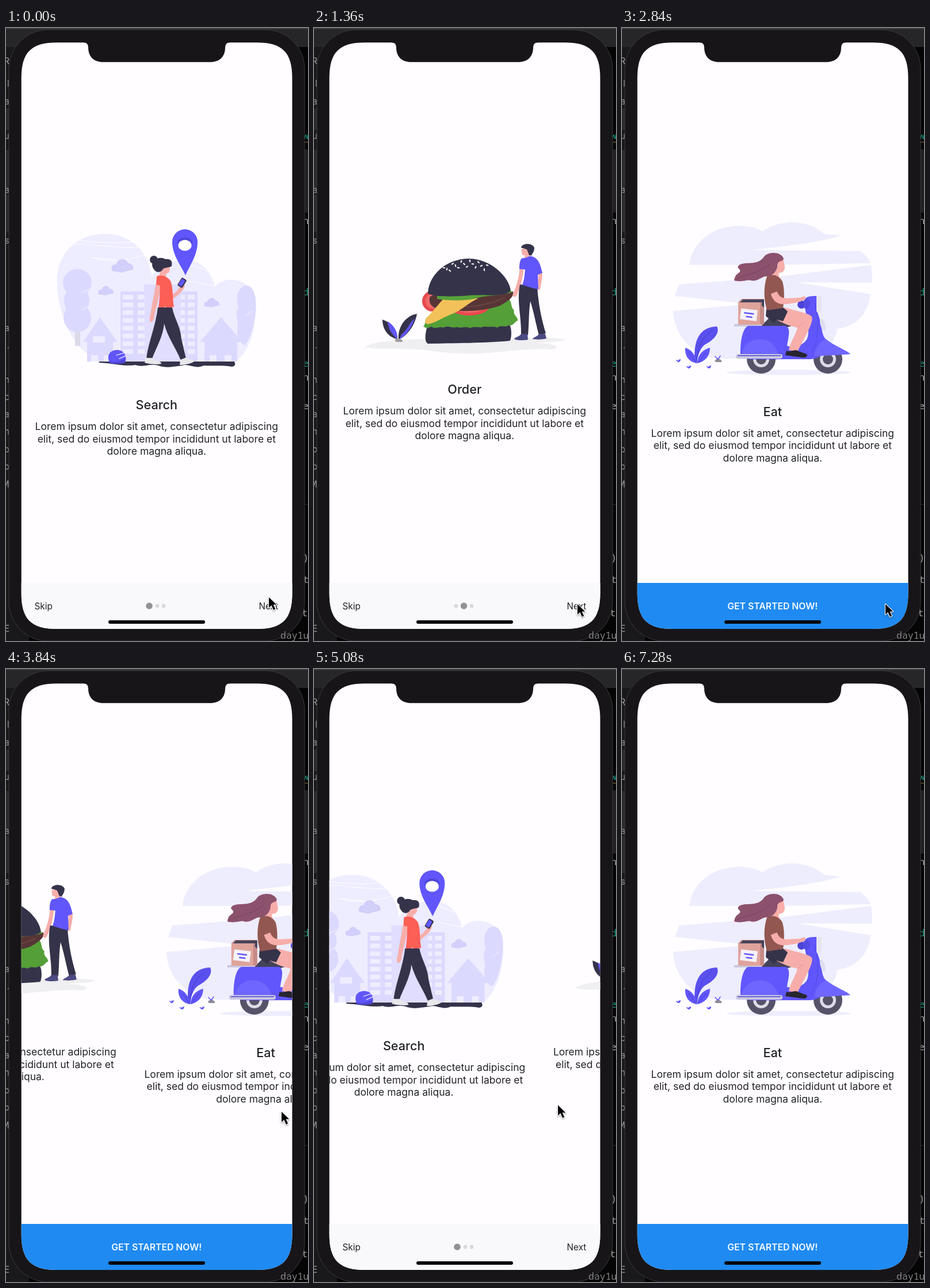
Recreate the animation shown at these times as an HTML page with a canvas. Size 525x1066 px, loop 7.32 s.

```html
<!DOCTYPE html>
<html lang="en">
<head>
<meta charset="utf-8">
<title>Onboarding</title>
<style>
html, body { margin: 0; width: 100%; height: 100%; overflow: hidden; background: #111; }
canvas { display: block; width: 525px; height: 1066px; }
</style>
</head>
<body>
<canvas id="stage" width="525" height="1066"></canvas>
<script>
const c = document.getElementById('stage').getContext('2d');
const LOOP = 7320, PAGE = 471, MID = 261.8;
const NAVY = '#35334a', BLUE = '#6156fb', SKIN = '#f7aeaa', HAZE = '#eeecff', LILAC = '#dcd9ff';
const SANS = 'Inter, sans-serif', MONO = '"Noto Sans Mono", monospace';

// Drawing helpers
const cache = new Map();
function path(d) {
  if (!cache.has(d)) cache.set(d, new Path2D(d));
  return cache.get(d);
}
function fill(color, d) { c.fillStyle = color; c.fill(path(d)); }
function line(color, width, d) {
  c.strokeStyle = color; c.lineWidth = width;
  c.lineCap = c.lineJoin = 'round';
  c.stroke(path(d));
}
function rect(color, x, y, w, h, r = 0) {
  c.fillStyle = color; c.beginPath(); c.roundRect(x, y, w, h, r); c.fill();
}
function oval(color, x, y, rx, ry = rx, turn = 0) {
  c.fillStyle = color; c.beginPath(); c.ellipse(x, y, rx, ry, turn, 0, 7); c.fill();
}
function text(str, x, y, font, color = '#222124', align = 'center') {
  c.font = font; c.fillStyle = color; c.textAlign = align;
  c.fillText(str, x, y);
}
function placed(x, y, angle, draw) {
  c.save(); c.translate(x, y); c.rotate(angle); draw(); c.restore();
}

// Motion
function easeIn(x) {
  if (x <= 0) return 0;
  if (x >= 1) return 1;
  let lo = 0, hi = 1;
  for (let i = 0; i < 22; i++) {
    const s = (lo + hi) / 2;
    if (1.26 * s * (1 - s) ** 2 + 3 * s * s - 2 * s ** 3 < x) lo = s; else hi = s;
  }
  return 3 * lo * lo - 2 * lo ** 3;
}
const smooth = u => u * u * (3 - 2 * u);
const pull = u => u ** 1.5;

// Drag by 188 px, then an overdamped spring to the previous page
function swipe(t, start) {
  const s = (t - start) / 1000;
  if (s <= 0) return 0;
  if (s < 0.2) return 188 / PAGE * pull(s / 0.2);
  const r = s - 0.2;
  return 1 - 0.79 * Math.exp(-9.07 * r) + 0.19 * Math.exp(-22 * r);
}
function pageAt(t) {
  if (t < 1500) return easeIn((t - 730) / 270);
  if (t < 3500) return 1 + easeIn((t - 2019.5) / 350);
  if (t < 4700) return 2 - swipe(t, 3640);
  if (t < 6100) return 1 - swipe(t, 4747);
  return 2 * easeIn((t - 6190) / 350);
}

const moves = [
  [0, 457, 989], [250, 457, 989], [600, 458, 1001], [3090, 458, 1001],
  [3600, 291, 772], [3640, 291, 772], [3840, 479, 769, pull], [3900, 482, 768],
  [4500, 238, 746], [4747, 238, 746], [4947, 426, 752, pull], [5040, 430, 754],
  [5580, 70, 971], [5660, 70, 971], [5900, 62, 1000], [6600, 62, 1000], [7200, 560, 930], [LOOP, 560, 930]
];
function cursorAt(t) {
  const i = moves.findIndex(m => m[0] > t);
  const [t0, x0, y0] = moves[i - 1], [t1, x1, y1, ease = smooth] = moves[i];
  const u = ease((t - t0) / (t1 - t0));
  return [x0 + (x1 - x0) * u, y0 + (y1 - y0) * u];
}

// Illustrations
function cloud(x, y, k) {
  c.save(); c.translate(x, y); c.scale(k, k);
  fill('#d1cefa', 'M-18 9C-22 2 -17 -4 -11 -3C-10 -13 5 -16 9 -5C15 -5 20 0 18 6C12 7 9 9 4 9C-2 14 -9 9 -18 9Z');
  line('#dcd9ff', 1, 'M-12 3L-3 8M-7 -2L7 6M-3 -7L13 3');
  c.restore();
}

function search() {
  fill(HAZE, 'M89 440C88 388 128 358 172 358C213 358 240 384 249 412L254 432C268 409 293 402 318 404C342 407 358 426 363 450C373 439 385 437 395 438C421 440 435 462 435 483C434 524 424 562 399 580L163 580C118 562 89 500 89 440Z');
  line('#fff', 1, 'M108 377C150 371 200 388 246 380M120 368C165 376 195 373 225 372M190 403L148 399C185 410 218 402 243 394M318 410L350 423M320 440L363 449');
  rect('#dcdae9', 120, 522, 9, 31);
  oval(LILAC, 124, 443, 25, 24); oval(LILAC, 123, 474, 22, 24); oval(LILAC, 124, 504, 24, 25);
  fill(LILAC, 'M434 470C431 450 420 444 411 450C399 459 401 474 404 486C397 498 403 506 403 517C399 533 405 548 416 552C428 535 436 500 434 470Z');
  line(HAZE, 1.5, 'M133 459L149 453M132 490L147 482M417 500L428 492');
  rect(LILAC, 199, 458, 134, 122); rect('#e0ddff', 240, 446, 65, 134);
  for (let y = 464; y < 572; y += 13.5) {
    rect(HAZE, 203, y, 18, 8); rect(HAZE, 229, y, 12, 8);
    rect(HAZE, 304, y, 7, 8); rect(HAZE, 316, y, 12, 8);
  }
  fill(LILAC, 'M163 503L194 546H186V580H141V546H134ZM374 503L411 546H402V580H345V546H337Z');
  rect(HAZE, 151, 536, 21, 11);
  for (const x of [148, 170, 354, 380]) rect(HAZE, x, 569, 12, 11);
  cloud(203, 414, 1); cloud(174, 457, 0.7); cloud(358, 478, 0.7);
  fill(NAVY, 'M162 580H397Q401 588 393 589C375 586 360 588 344 587C329 594 318 583 306 587C288 589 278 592 265 587C247 583 240 591 225 586C203 589 188 583 162 582Z');
  fill(BLUE, 'M180 582C174 569 181 560 193 560C205 560 211 570 207 582C197 585 188 584 180 582Z');
  fill('#4e46d5', 'M179 579C187 583 200 580 207 574L207 582C198 585 186 585 179 582Z');
  line('#fff', 1.3, 'M192 569L205 565M197 575L208 570');
  fill(BLUE, 'M312 430C304 412 289 395 289 372A22 22 0 0 1 333 372C333 395 320 412 312 430Z');
  oval('#4f46db', 311, 374, 13, 10); oval('#fff', 311, 378, 11.5, 9.5);

  fill(SKIN, 'M269 415L284 412C286 420 285 425 278 428L279 437L266 435Z');
  oval(NAVY, 257, 403, 7);
  fill(NAVY, 'M254 413C253 402 268 396 277 402C286 401 290 405 288 414C284 417 277 416 273 419C269 427 258 427 254 413Z');
  fill(SKIN, 'M285 464C293 464 299 455 303 449L311 447C310 456 297 468 287 472Z');
  placed(306, 443, 0.55, () => { rect(NAVY, -5, -8, 10, 16, 2); rect(BLUE, -4, -6, 7, 12, 1); });
  fill('#fb5f55', 'M262 432C268 428 280 431 286 440C291 451 289 470 292 485L279 487L277 484L274 487H265C267 474 268 461 267 448L261 447Z');
  fill(NAVY, 'M264 486H289C293 507 303 517 305 541L313 575L304 578C294 554 281 538 275 514C273 537 260 558 254 575L244 574C248 544 260 519 264 486Z');
  fill(SKIN, 'M260 446L268 448C267 470 261 484 258 499C258 506 255 512 251 511C248 507 251 500 252 494C254 477 258 463 260 446Z');
  fill('#e8e8eb', 'M244 573C250 575 254 572 257 576C263 580 270 579 270 584C260 586 247 584 241 582ZM303 577L313 573C318 577 327 576 327 580C321 584 309 586 302 586Z');
}

function order() {
  fill('#efeef0', 'M88 555C100 545 150 541 195 541H340C380 538 425 538 437 542C430 546 400 546 385 548C425 548 427 556 415 559C380 556 330 563 290 566C250 567 205 563 195 560C150 556 110 560 88 555Z');
  fill(NAVY, 'M145 541C130 538 119 525 119 507C134 512 143 524 145 541ZM147 542C145 519 160 500 179 497C176 515 164 534 147 542Z');
  fill(BLUE, 'M145 541C133 531 129 521 128 510C140 518 146 529 145 541ZM149 541L152 533C162 526 166 512 175 505C170 520 161 534 149 541Z');
  fill('#a19fa1', 'M140 542Q146 537 154 543L153 546H143Z');

  fill(NAVY, 'M197 518C240 515 300 518 340 516C345 524 343 544 340 544C300 548 240 548 198 549C191 545 194 529 197 518Z');
  oval('#e8494e', 206, 475, 18); oval('#f06a69', 207, 475, 13);
  fill('#549f38', 'M190 519C196 514 190 507 199 501C220 494 300 490 338 470C345 477 341 485 348 491C345 499 356 503 354 509C349 510 347 519 338 517C332 522 326 515 319 521C311 518 304 521 296 519C288 523 280 517 271 522C263 518 257 523 249 520C240 523 233 516 225 521C216 518 211 525 204 519C198 523 194 522 190 519Z');
  oval('#e8494e', 270, 484, 35, 16); oval('#f06a69', 270, 482, 28, 13);
  fill('#573537', 'M201 468C215 456 250 469 283 468C310 465 331 461 346 458C349 467 338 475 323 483C288 495 246 494 211 487C202 483 200 477 201 468Z');
  line('#6b4441', 2, 'M228 482C264 488 302 483 331 469');
  fill('#f3c15a', 'M224 472L286 470C265 480 258 490 243 496C226 502 211 513 198 515C192 514 191 509 197 503Z');
  fill('#57a33a', 'M214 466C250 460 312 463 337 453L345 459C323 467 296 464 278 471C257 475 231 474 214 471Z');
  fill(NAVY, 'M198 462C199 430 229 401 270 401C309 402 340 434 342 457C330 469 300 463 270 465C237 468 207 467 198 462Z');
  for (let i = 0; i < 16; i++) {
    const x = 226 + 5 * i, y = 405 + ((x - 268) / 42) ** 2 * 12 + (i * 7 % 3) * 5;
    placed(x, y, i * 1.9, () => oval('#fff', 0, 0, 2.5, 1.1));
  }

  line(SKIN, 7, 'M361 418C360 435 356 449 349 464M393 424C395 435 391 443 390 452');
  fill(SKIN, 'M361 384L375 383L375 400L365 401L367 395Q360 398 361 384Z');
  fill(NAVY, 'M360 382C361 374 379 373 383 382C383 390 379 392 378 396L374 395L370 385Z');
  fill(NAVY, 'M358 446L388 449C390 481 396 508 403 531L391 534C385 512 382 493 376 475C373 495 374 515 372 534H360C361 502 352 476 358 446Z');
  fill(BLUE, 'M362 400C370 401 373 396 378 397C391 400 394 413 397 426L389 429L390 454C379 453 371 449 362 447C366 437 366 428 367 420L357 419C357 409 358 403 362 400Z');
  fill('#4b4a82', 'M360 532H371L372 542C363 544 352 543 348 541C350 537 357 537 360 532ZM391 532H402L404 540C396 542 386 542 380 541C382 537 388 537 391 532Z');
}

function sprout() {
  fill(BLUE, 'M0 3C-3 2 -4 0 -4 -1C-2 -1 0 1 0 3C0 0 1 -2 4 -2C4 1 2 3 0 3M-1 3L0 -3L1 3');
}

function wheel(x) {
  oval('#565369', x, 576, 25); oval('#dddce8', x, 576, 14);
  oval('#565369', x, 576, 9);
}

function eat() {
  const mist = '#eeedfd';
  fill(mist, 'M117 412C122 370 160 344 203 344C225 344 240 350 244 354C272 333 322 331 351 358L381 361C340 374 278 380 225 386L415 388C423 394 430 403 432 409L270 412Z');
  fill(mist, 'M99 446L275 432L433 412Q435 426 435 443L303 442L432 463C428 495 410 518 375 523C368 552 350 575 300 575H165C112 566 90 525 89 492L225 480L92 466Z');
  oval(mist, 290, 599, 108, 4.5);
  fill('#5a50ee', 'M127 582C123 545 134 520 165 519C172 532 154 546 145 550C136 556 132 568 130 583Z');
  fill(BLUE, 'M130 583C114 580 109 568 110 556C122 560 129 570 130 583ZM131 583C131 570 140 559 153 556C153 570 145 580 131 583Z');
  line('#403acb', 0.8, 'M130 581C130 558 139 538 157 526M130 582L116 564M132 582L146 564');
  for (const [x, y] of [[98, 578], [116, 589], [151, 589]]) placed(x, y, 0, sprout);
  fill('#8f8d96', 'M161 578L167 574L173 578V581H163Z');
  line(BLUE, 1.5, 'M167 576L162 571M167 576L171 570');

  wheel(242); wheel(358);
  fill('#cac8df', 'M195 515H245V519H195Z');
  fill('#44435a', 'M243 517L258 502L299 517L288 520H245Z');
  fill(BLUE, 'M206 570C205 535 213 519 220 518H285C295 523 288 541 287 553C301 556 314 552 321 542C329 529 319 497 316 474Q319 465 338 466L340 495C348 515 346 531 353 540C370 554 390 560 397 567L345 570C336 576 329 576 320 576H222Z');
  fill('#6e66ff', 'M207 569A33 34 0 0 1 272 569ZM354 541C371 554 389 560 397 567L334 571Q336 551 354 541Z');
  line('#5148e0', 1, 'M334 478C344 506 342 547 329 565');
  rect('#cac8df', 198, 567, 81, 8, 4); rect('#4f48d8', 201, 569, 75, 1.5);
  rect('#e6e5ee', 338, 466, 9, 29, 4); oval('#dfddf0', 349, 516, 4, 11, -0.3);
  oval('#4b43d7', 312, 481, 7); oval('#554ce4', 321, 480, 6, 9);

  rect('#dfa39b', 202, 477, 43, 39); rect('#c58b87', 240, 476, 7, 39);
  fill('#cf9690', 'M202 477L208 471H247L240 478H202Z');
  fill('#44435a', 'M205 477L210 472H247V486L243 483V477Z');
  placed(220, 498, 0.12, () => {
    rect('#f4f1f8', -14, -9, 29, 19);
    rect(BLUE, -8, -3, 17, 2.5); rect(BLUE, -4, 3, 11, 2.5);
  });

  fill(SKIN, 'M275 495L283 486C301 492 324 495 330 502C334 512 316 540 305 563L290 560C293 545 302 534 305 521C294 519 278 513 267 506Z');
  line('#e3908f', 1, 'M306 521L315 513');
  fill('#27252f', 'M286 561C293 565 300 557 307 562L321 567Q324 573 314 573L284 569Z');
  fill(NAVY, 'M251 488L279 485L288 493L280 510L269 507L264 513L250 501Z');
  fill(SKIN, 'M264 409L280 401L283 415Q283 426 272 426L274 437L260 434Z');
  fill('#925750', 'M252 432C262 426 274 431 279 441C283 455 282 473 280 487L252 491C246 470 246 450 252 432Z');
  fill(SKIN, 'M258 460L269 457C272 466 277 470 286 470L309 469L318 466L319 472L309 476C298 479 285 481 276 480C266 478 261 471 258 460Z');
  fill('#925750', 'M253 436C264 433 270 449 270 458L257 463Z');
  fill('#8c526d', 'M281 401C276 387 251 389 246 399C234 415 210 404 202 414C199 419 209 419 204 425C198 429 196 432 195 439C207 443 218 437 224 439C235 442 244 431 251 432C264 432 271 419 270 411C273 403 280 407 281 401Z');
  line('#74425c', 1, 'M199 437C219 426 241 427 257 410');
}

const pages = [
  { draw: search, title: 'Search', y: 663 },
  { draw: order, title: 'Order', y: 636 },
  { draw: eat, title: 'Eat', y: 674.5 }
];
const copy = ['Lorem ipsum dolor sit amet, consectetur adipiscing',
  'elit, sed do eiusmod tempor incididunt ut labore et', 'dolore magna aliqua.'];

function drawPages(pos) {
  pages.forEach((p, i) => {
    const dx = (i - pos) * PAGE;
    if (Math.abs(dx) >= PAGE) return;
    c.save();
    c.translate(dx, 0);
    p.draw();
    text(p.title, MID, p.y, '500 21.6px ' + SANS);
    copy.forEach((s, n) => text(s, MID, p.y + 36 + n * 21.6, '17.5px ' + SANS));
    c.restore();
  });
}

// Surroundings
const leftBits = [['R', 63], ['I', 102], ['a', 133], ['u', 193], ['a', 287], ['s', 375], ['a', 527],
  ['.', 557], ['n', 617], ['c', 647], ['a', 677], ['n', 707], ['o', 738], ['o', 768], ['M', 799], ['E', 1050]];
const rightBits = [['w', 193, 1], ['n', 341], ['d', 465, 1], ['e', 589, 1], ['n', 613], ['e', 663],
  [')', 927], ['t', 965], ['te', 1023]];

function backdrop() {
  rect('#050506', 0, 0, 525, 1066);
  rect('#19181a', 0, 0, 40, 1066);
  rect('#262527', 0, 0, 525, 33);
  rect('#3c3a3c', 0, 0, 525, 2);
  for (const [y, h] of [[140, 37], [212, 68], [290, 65]]) rect('#2b2a2c', 0, y, 30, h);
  rect('#202023', 515, 211, 10, 110);
  for (const [s, y] of leftBits) text(s, 6, y, '16px ' + SANS, '#99979a', 'right');
  for (const [s, y, teal] of rightBits)
    text(s, s.length > 1 ? 514 : 516, y, '17px ' + MONO, teal ? '#16967e' : '#a5a5a5', 'left');
  rect('#8b7430', 518, 198, 7, 1);
  rect('#29292b', 515, 828, 10, 1);
  c.beginPath(); c.roundRect(5, 3, 514, 1063, 68);
  c.fillStyle = '#171518'; c.fill();
  c.strokeStyle = '#3d3b3f'; c.lineWidth = 1; c.stroke();
  text('day1u', 477, 1062, '16.5px ' + MONO, '#858386', 'left');
}

function bottomBar(index) {
  if (index === 2) {
    rect('#1f8af1', 26, 965, 472, 81);
    text('GET STARTED NOW!', MID, 1010.5, '600 15.8px ' + SANS, '#f5faff');
    return;
  }
  rect('#f9f8fb', 26, 965, 472, 81);
  text('Skip', 49.5, 1010.5, '15.3px ' + SANS, '#222124', 'left');
  text('Next', 473.3, 1010.5, '15.3px ' + SANS, '#222124', 'right');
  const spots = index ? [247, 260.5, 274] : [249, 263, 274];
  spots.forEach((x, i) => oval(i === index ? '#929194' : '#d9d8db', x, 1005, i === index ? 5.8 : 3.4));
}

// Rectangle with continuous-curvature corners
function screenShape(l, t, r, b, size = 62, k = 17) {
  c.beginPath();
  c.moveTo(l, t + size);
  c.bezierCurveTo(l, t + k, l + k, t, l + size, t);
  c.lineTo(r - size, t);
  c.bezierCurveTo(r - k, t, r, t + k, r, t + size);
  c.lineTo(r, b - size);
  c.bezierCurveTo(r, b - k, r - k, b, r - size, b);
  c.lineTo(l + size, b);
  c.bezierCurveTo(l + k, b, l, b - k, l, b - size);
  c.closePath();
}

function pointer(x, y) {
  c.save();
  c.translate(x, y);
  c.scale(0.95, 0.95);
  c.shadowColor = 'rgba(0,0,0,.35)'; c.shadowBlur = 3; c.shadowOffsetY = 1.5;
  const arrow = 'M0 1V20L4.6 15.8L8.3 24.2L11.8 22.7L8.1 14.6H14Z';
  line('#fff', 2.4, arrow);
  c.shadowColor = 'transparent';
  fill('#000', arrow);
  c.restore();
}

function render(t) {
  backdrop();
  c.save();
  screenShape(26.7, 25.3, 497.5, 1045); c.clip();
  rect('#fffdff', 26, 25, 472, 1021);
  drawPages(pageAt(t));
  bottomBar(Math.round(pageAt(Math.max(0, t - 50))));
  c.restore();
  fill('#171518', 'M135 24V25.3Q143 25.3 143 34C143 50 153 59.3 169 59.3H355C371 59.3 381 50 381 34Q381 25.3 389 25.3V24Z');
  rect('#050507', 178, 1030, 168, 6, 3);
  pointer(...cursorAt(t));
}

const begin = performance.now();
function tick() {
  render((performance.now() - begin) % LOOP);
  requestAnimationFrame(tick);
}
tick();
</script>
</body>
</html>
```
